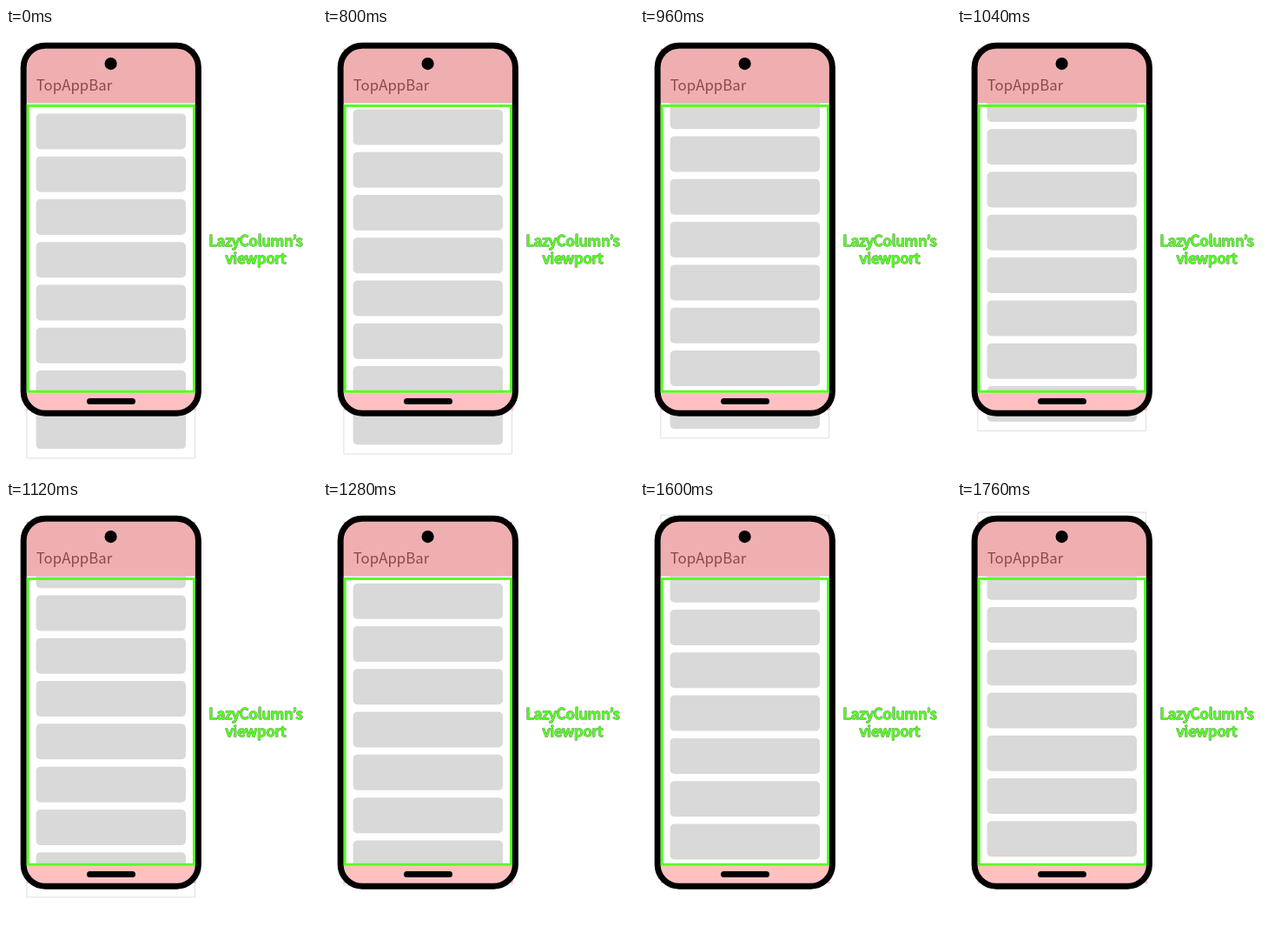
Recreate the animation shown at these times as an HTML page with a canvas. Size 358 by 512 pixels, loop 1.88 s.

```html
<!DOCTYPE html>
<html lang="en">
<head>
<meta charset="utf-8">
<title>List viewport</title>
<style>
  html, body { margin: 0; width: 100%; height: 100%; overflow: hidden; background: #fff; }
  canvas { display: block; }
</style>
</head>
<body>
<canvas id="stage" width="358" height="512"></canvas>
<script>
const ctx = document.getElementById('stage').getContext('2d');

const LOOP = 1880, HOLD = 800, STEP = 40, STEPS = 25, TRAVEL = 75;
const FONT = '16.8px "Noto Sans CJK JP", "Noto Sans CJK", "Noto Sans", sans-serif';
const GREEN = '#55ff22';

// cubic-bezier(0, 0, 0.58, 1), solved for its parameter by bisection
function easeOut(x) {
  let low = 0, high = 1;
  for (let i = 0; i < 24; i++) {
    const s = (low + high) / 2;
    if (1.74 * s * s - 0.74 * s ** 3 < x) low = s; else high = s;
  }
  return 3 * low * low - 2 * low ** 3;
}

function scrollAt(time) {
  if (time < HOLD) return 0;
  const step = Math.min(STEPS, Math.floor((time - HOLD) / STEP) + 1);
  return step === STEPS ? TRAVEL : TRAVEL * easeOut(step / STEPS);
}

function fillBox(color, x, y, w, h, r = 0) {
  ctx.fillStyle = color;
  ctx.beginPath();
  ctx.roundRect(x, y, w, h, r);
  ctx.fill();
}

function strokeBox(color, width, x, y, w, h, r = 0) {
  ctx.strokeStyle = color;
  ctx.lineWidth = width;
  ctx.beginPath();
  ctx.roundRect(x, y, w, h, r);
  ctx.stroke();
}

function drawList(scroll) {
  const top = 88 - scroll;
  strokeBox('#dedede', 1, 23.9, top, 193.7, 407);
  for (let i = 0; i < 8; i++) {
    fillBox('#d9d9d9', 34.6, top + 10.4 + i * 49.28, 172.4, 41, 5);
  }
}

function drawPhone() {
  fillBox('#efafb0', 23.7, 23.7, 194.3, 62.8);
  fillBox('#ffc0c1', 23.7, 419.5, 195.3, 20.5);
  strokeBox('#000', 7, 20.2, 20.2, 201.2, 423, 25);
  fillBox('#000', 113.5, 34, 14.2, 14.2, 7.1);
  fillBox('#000', 93, 426, 56, 7, 3.5);
  ctx.font = FONT;
  ctx.textAlign = 'left';
  ctx.fillStyle = '#8c494a';
  ctx.fillText('TopAppBar', 34.8, 71.5);
}

function outlinedText(text, x, y) {
  for (const [color, width] of [['#707070', 1.6], [GREEN, 0.9]]) {
    ctx.strokeStyle = color;
    ctx.lineWidth = width;
    ctx.strokeText(text, x, y);
  }
  ctx.fillStyle = GREEN;
  ctx.fillText(text, x, y);
}

function drawViewport() {
  strokeBox(GREEN, 3, 25.2, 89.5, 191.3, 328.8);
  ctx.font = FONT;
  ctx.textAlign = 'center';
  ctx.lineJoin = 'round';
  outlinedText('LazyColumn’s', 287.6, 251);
  outlinedText('viewport', 287.6, 271);
  ctx.lineJoin = 'miter';
}

function draw(time) {
  fillBox('#fff', 0, 0, 358, 512);
  drawList(scrollAt(time));
  drawPhone();
  drawViewport();
}

let start;
function tick(now) {
  start ??= now;
  draw((now - start) % LOOP);
  requestAnimationFrame(tick);
}
draw(0);
requestAnimationFrame(tick);
</script>
</body>
</html>
```
